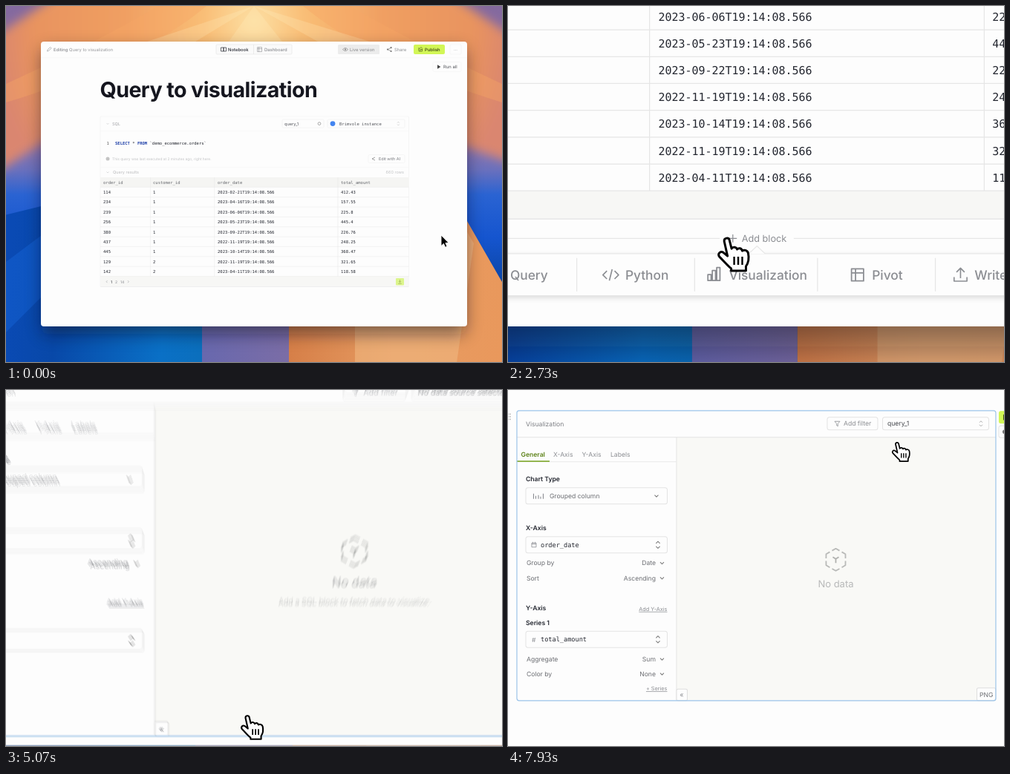
Animation, 668 px wide and 480 px high, one loop 8 s. Source, as an HTML page:

```html
<!DOCTYPE html>
<html lang="en">
<head>
<meta charset="utf-8">
<title>Query to visualization</title>
<style>
html, body { margin: 0; width: 100%; height: 100%; overflow: hidden; background: #fdfdfd; }
svg { display: block; width: 100vw; height: 100vh; font-family: Inter, sans-serif; text-rendering: geometricPrecision; }
.mono { font-family: "DejaVu Sans Mono", monospace; white-space: pre; }
</style>
</head>
<body>
<svg id="stage" viewBox="0 0 668 480"></svg>
<script>
const LOOP = 8000;
const INK = '#23262f', GREY = '#8b8d92', FAINT = '#c3c4c6', LINE = '#e6e6e6', LIME = '#d2f656';

// Drawing helpers
const text = (x, y, s, size, fill = INK, more = '') =>
  `<text x="${x}" y="${y}" font-size="${size}" fill="${fill}" ${more}>${s}</text>`;
const mono = (x, y, s, size, fill = INK, more = '') => text(x, y, s, size, fill, 'class="mono" ' + more);
const box = (x, y, w, h, fill = 'none', stroke = 'none', r = 0, more = '') =>
  `<rect x="${x}" y="${y}" width="${w}" height="${h}" rx="${r}" fill="${fill}" stroke="${stroke}" ${more}/>`;
const line = (d, stroke = GREY, w = 0.6, more = '') =>
  `<path d="${d}" fill="none" stroke="${stroke}" stroke-width="${w}" stroke-linejoin="round" ${more}/>`;
const shape = (d, fill, more = '') => `<path d="${d}" fill="${fill}" ${more}/>`;
const group = (id, inner, more = '') => `<g id="${id}" ${more}>${inner}</g>`;
const stops = list => list.map(([o, c]) => `<stop offset="${o}" stop-color="${c}"/>`).join('');
const bold = 'font-weight="600"', medium = 'font-weight="500"', right = 'text-anchor="end"', mid = 'text-anchor="middle"';
const thin = 'stroke-width=".5"';

const bars = (x, y, c, w) => line(`M${x - 3} ${y}v3h1.6v-3zM${x - .8} ${y - 2}v5h1.6v-5zM${x + 1.4} ${y - 3.5}v6.5h1.6v-6.5z`, c, w);
const grid = (x, y, c, w) => line(`M${x - 3} ${y - 3}h6v6h-6zM${x - 3} ${y - 1}h6M${x - 1} ${y - 3}v6`, c, w);
const down = (x, y) => line(`M${x - 2.5} ${y - 1.2}l2.5 2.5l2.5-2.5`, '#777', 1);
const updown = (x, y) => line(`M${x - 2.6} ${y - 2}l2.6-2.6l2.6 2.6M${x - 2.6} ${y + 2}l2.6 2.6l2.6-2.6`, '#777', 1);

function backdrop() {
  return box(-200, -200, 1068, 900, 'url(#sky)')
    + shape('M-200 600V330L47 270L264 250V600Z', 'url(#sea)')
    + shape('M0 345L60 300L60 380L0 440Z', '#1766dc', 'opacity=".4"')
    // Warm band and its rays
    + shape('M-80 85L78 -20H590L748 85V235L621 190L334 60L47 185L-80 270Z', 'url(#glow)', 'filter="url(#melt)"')
    + shape('M205 0Q130 45 0 105V130Q180 75 270 0Z', '#f6a565', 'opacity=".4"')
    + shape('M463 0Q540 45 668 105V130Q490 75 400 0Z', '#f6a565', 'opacity=".4"')
    + shape('M334 0L190 48H255ZM334 0L300 48H372ZM334 0L420 48H490Z', '#fff0c4', 'opacity=".22"')
    + shape('M264 600V350L334 200L381 350V600Z', 'url(#dusk)')
    + shape('M381 600V300L480 200L621 290L668 372L900 700V600Z', 'url(#sand)')
    + shape('M470 600V430L560 200L630 320L590 600Z', '#f0b880', 'opacity=".6"');
}

function topBar() {
  return line('M47 70H621', '#f3f3f3', .6)
    + line('M55.5 61l.6-2l3.6-3.6l1.4 1.4l-3.6 3.6z', GREY, .6)
    + text(64, 61, `<tspan ${bold}>Editing</tspan> Query to visualization`, 5.8, '#97989c')
    + box(283, 52, 102, 13, '#fafafa', '#dcdcdc', 1.5, thin) + line('M333.5 52v13', '#dcdcdc', .5)
    + line('M289.5 56h3.5v5h-3.5zM293 56h3.5v5h-3.5z', INK, .7) + text(299, 61, 'Notebook', 5.9, INK, medium)
    + grid(341.5, 58.6, GREY, .6) + text(348, 61, 'Dashboard', 5.9, GREY, medium)
    + box(447, 52, 56, 13, '#ececec', 'none', 1.5)
    + line('M453.5 58.6q3.5-4 7 0q-3.5 4-7 0z', '#777') + `<circle cx="457" cy="58.6" r="1" fill="#777"/>`
    + text(463, 61, 'Live version', 5.9, '#858689')
    + line('M518.6 56.2l-4.4 2.4l4.4 2.4', '#777', .7)
    + [[518.6, 56.2], [514, 58.6], [518.6, 61]].map(([x, y]) => `<circle cx="${x}" cy="${y}" r="1.1" fill="#777"/>`).join('')
    + text(523, 61, 'Share', 5.9, GREY)
    + box(549, 52, 42, 13, LIME, 'none', 2)
    + line('M556 56v5h4.5v-3M556 58.5l3-3l2 2M558 61v-2.5h3', '#3f4a15', .6)
    + text(564, 61, 'Publish', 5.9, '#333b12', medium)
    + box(598, 52, 15, 13, 'none', '#ededed', 1.5, thin) + text(605.5, 60, '...', 6, GREY, mid)
    + box(575, 75.5, 38, 13, 'none', '#f0f0f0', 1.5, thin)
    + shape('M581 79.3l4.4 2.7l-4.4 2.7z', '#444') + text(589, 84.2, 'Run all', 5.9, '#4e5056');
}

const COLS = [131, 198, 285, 451];
const ROWS = [
  '114 1 2023-02-21 412.43', '234 1 2023-04-16 157.55', '239 1 2023-06-06 225.8',
  '256 1 2023-05-23 445.4', '380 1 2023-09-22 226.76', '437 1 2022-11-19 248.25',
  '445 1 2023-10-14 368.47', '129 2 2022-11-19 321.65', '142 2 2023-04-11 118.58'];

function queryBlock() {
  let s = text(126.5, 123, 'Query to visualization', 28.6, '#15161f', 'font-weight="700" letter-spacing="-.56"')
    + box(127, 149, 415.5, 229.5, 'none', '#ededed', 1, thin)
    + line('M135.5 158l1.5 1.5l1.5-1.5', FAINT) + text(143, 160.8, 'SQL', 5.6, '#a5a6aa')
    + line('M127 168.5H542', '#f4f4f4', .5)
    + box(372, 153, 56, 11, 'none', '#ebebeb', 1.5, thin) + text(375, 160.6, 'query_1', 5.6, '#55575d')
    + `<circle cx="422" cy="158.6" r="1.9" fill="none" stroke="#aaa" stroke-width="1"/>`
    + box(433, 153, 104, 11, 'none', '#ebebeb', 1.5, thin)
    + `<circle cx="440" cy="158.6" r="3.4" fill="#4385f0"/>`
    + mono(449, 160.6, 'Brimvole instance', 5.55, '#55575d')
    + line('M527 157.6l1.4-1.4l1.4 1.4M527 159.6l1.4 1.4l1.4-1.4', '#aaa', .5)
    + mono(135.5, 187, '1', 5.5, '#555')
    + mono(147, 187, `<tspan fill="#1d3fa8" ${bold}>SELECT</tspan> * <tspan fill="#1d3fa8" ${bold}>FROM</tspan> \`demo_ecommerce.orders\``, 5.52)
    + `<circle cx="137" cy="206" r="2.5" fill="#c4c4c4"/>`
    + text(143, 208, 'This query was last executed at 2 minutes ago, right here.', 4.9, FAINT)
    + box(488, 200.5, 49, 11, 'none', '#efefef', 1.5, thin)
    + line('M497 204l-4 2l4 2', '#777', .7) + text(502, 208, 'Edit with AI', 5.5, '#77797e')
    + line('M127 217.5H542', '#f4f4f4', .5)
    + line('M135.5 223.5l1.5 1.5l1.5-1.5', FAINT)
    + text(144, 226.4, 'Query results', 5.5, '#bcbdbf') + text(536, 226.4, '660 rows', 5.5, FAINT, right)
    + box(127, 231, 415.5, 13.3, '#f5f5f3') + box(127, 364.5, 415.5, 14, '#f7f7f5');
  ['order_id', 'customer_id', 'order_date', 'total_amount'].forEach((h, i) => s += mono(COLS[i], 239.8, h, 5.52, '#66686d'));
  ROWS.forEach((row, i) => {
    const y = 244.3 + 13.36 * i;
    s += line(`M127 ${y}H542.5`, LINE, .45);
    row.split(' ').forEach((v, c) => s += mono(COLS[c], y + 8.8, c == 2 ? v + 'T19:14:08.566' : v, 5.52));
  });
  s += line('M127 364.5H542.5M127 378.5H542.5M194.5 231V364.5M280.6 231V364.5M447 231V364.5', LINE, .45)
    + line('M136.5 370.2l-1.4 1.5l1.4 1.5M164 370.2l1.4 1.5l-1.4 1.5', GREY, .5)
    + text(141, 373.6, '1', 5, INK) + text(147, 373.6, '2', 5, GREY) + text(154, 373.6, '14', 5, GREY)
    + box(525, 367, 11, 9.5, '#dcf58c', 'none', 1) + line('M530.5 369v3.5M529 371.2l1.5 1.5l1.5-1.5M528.3 374.3h4.4', '#7d8c3c', .5);
  return s;
}

function addBlock() {
  const menu = box(127, 395.8, 415.5, 20.9, '#fdfdfd', LINE, 1, 'stroke-width=".45" filter="url(#soft)"')
    + shape('M330 395.9l4-3.8l4 3.8z', '#fdfdfd') + line('M330 395.8l4-3.8l4 3.8', LINE, .45)
    + box(305, 398, 56.6, 16.6, '#efeff1', 'none', 2, 'id="hover"')
    + line('M185 398v16.6M244.4 398v16.6M303 398v16.6M364.1 398v16.6M422.7 398v16.6M490 398v16.6', LINE, .45)
    + text(152, 408.6, 'Text', 6.4, GREY, medium) + line('M141 404h5M143.5 404v5', GREY)
    + line('M200.5 404v5q3 2 6 0v-5q-3-2-6 0q3 2 6 0', GREY)
    + text(211.3, 408.6, 'Query', 6.4, GREY, medium)
    + line('M259.4 404.4l-2 2l2 2M263.2 404.4l2 2l-2 2M262 403.6l-1.4 5.6', GREY)
    + text(268.5, 408.6, 'Python', 6.4, GREY, medium)
    + group('visItem', bars(312.6, 406.2, 'currentColor', .65) + text(320, 408.6, 'Visualization', 6.4, 'currentColor', medium))
    + grid(384, 406.4, GREY, .65) + text(391.2, 408.6, 'Pivot', 6.4, GREY, medium)
    + line('M435.2 408v-5M433.2 405l2-2l2 2M432 407.5v2h6.4v-2', GREY) + text(442.2, 408.6, 'Writeback', 6.4, GREY, medium)
    + text(510, 408.6, 'More', 6.4, GREY, medium);
  return line('M127 388.2H315.5M352.3 388.2H542.5', LINE, .45)
    + line('M320 388.2h4M322 386.2v4', GREY, .45) + text(326.4, 389.9, 'Add block', 4.7, GREY)
    + group('menu', menu);
}

function visBlock() {
  const F = 8.6, SOFT = '#6c6e73';
  const field = (y, icon, label, id) => box(24, y, 190.5, 22, '#fdfdfd', '#e3e3e3', 3)
    + updown(202, y + 11) + group(id + 'Empty', mono(32, y + 14, 'Column', F, '#9a9ba0'))
    + group(id + 'Full', icon + mono(44, y + 14, label, F));
  const option = (y, name, value) => text(25, y, name, F, SOFT) + text(199, y, value, F, SOFT, right) + down(207.5, y - 3);
  const head = (y, s) => text(24, y, s, F, INK, bold);
  const link = (y, s) => text(214.5, y, s, 7.3, GREY, right + ' text-decoration="underline"');

  const panel = text(17.5, 90, 'General', F, '#5d8218', bold)
    + text(61, 90, 'X-Axis', F, GREY) + text(99.5, 90, 'Y-Axis', F, GREY) + text(138, 90, 'Labels', F, GREY)
    + line('M12 97H227', '#e9e9e9', 1) + line('M12 96.3H56', '#86ad3a', 1.7)
    + head(123, 'Chart Type') + box(24, 132, 190.5, 22, '#fdfdfd', '#e3e3e3', 3)
    + line('M34.5 147v-7M37.5 147v-4M41 147v-5M44 147v-3M47.5 147v-7', GREY, 1.1)
    + text(56, 146.2, 'Grouped column', F, SOFT) + down(200, 143)
    + head(189.5, 'X-Axis')
    + field(198, line('M32 206.5h6v5.5h-6zM32 208h6M33.5 205v1.5M36.5 205v1.5', GREY, .8), 'order_date', 'x')
    + group('groupBy', option(236.6, 'Group by', 'Date'))
    + group('lower', option(256.8, 'Sort', 'Ascending')
      + head(297, 'Y-Axis') + link(298, 'Add Y-Axis') + head(317, 'Series 1')
      + field(325.5, text(32, 339.8, '#', F, GREY), 'total_amount', 'y')
      + group('yOptions', option(366, 'Aggregate', 'Sum') + option(386, 'Color by', 'None') + link(405.5, '+ Series')));

  let dash = '';
  for (let a = 0; a < 6; a++) dash += line('M-5-12.2L0-15L5-12.2', '#b9bab8', 1.8, `transform="rotate(${a * 60})"`);

  return box(12, 28, 645, 391, '#fdfdfd', 'none', 3)
    + box(227, 64, 430, 355, '#f9f9f6') + line('M12 64H657M227 64V419', '#e4e4e4', 1)
    + text(24, 49, 'Visualization', F, '#7c7e83')
    + box(430, 37, 68, 17, 'none', '#e3e3e3', 3)
    + line('M440 42.5h7l-2.7 3.2v3.3l-1.6-.9v-2.4z', GREY, .8) + text(452, 48.5, 'Add filter', F, GREY)
    + box(504.5, 37, 143, 17, '#fdfdfd', '#e3e3e3', 3)
    + text(511, 48.5, '', F, '#44464c', 'id="source"')
    + line('M635 44l2-2l2 2M635 47l2 2l2-2', '#999', .8)
    + panel
    + box(227, 403.5, 14.5, 15.5, '#fdfdfd', '#dedede', 2) + text(234, 414.5, '«', 9, GREY, mid)
    + box(631.5, 402, 25.5, 17, '#fdfdfd', '#dedede', 2) + text(644.2, 414, 'PNG', F, SOFT, mid)
    + group('noData', `<g transform="translate(441.5 229)">${dash}${line('M-4-3.5L0-1L4-3.5M0-1V4.5', '#b0b1af', 1.8)}</g>`
      + text(441.5, 266.6, 'No data', 13, '#b8b9b9', mid))
    + text(441.5, 277.5, 'Add a SQL block to fetch data to visualize.', 8.2, '#c6c7c6', mid + ' id="hint"')
    + box(12, 28, 645, 391, 'none', '#9cc4ea', 3, 'stroke-width="1.2"')
    + group('list', box(504.5, 57, 143, 32, '#fff', '#e0e0e0', 3, 'filter="url(#soft)"')
      + box(508, 62, 136, 21, '#f0f0f1', 'none', 2) + text(514, 75.5, 'query_1', F))
    + group('tools', box(661, 28.5, 18, 17, LIME, 'none', 3) + shape('M667 33l7 4l-7 4z', '#48551a')
      + box(661, 48.5, 18, 16, '#fdfdfd', '#e3e3e3', 3) + `<circle cx="669" cy="56.5" r="3" fill="#777"/>`
      + line('M-.2 32v9M2.8 32v9', '#aaa', 1.5, 'stroke-dasharray="1.5 2"'));
}

const K = 1.554, BLOCK_Y = 403, SCROLL = 277, COPIES = 7;
const grad = (id, kind, at, list) => `<${kind}Gradient id="${id}" ${at}>${stops(list)}</${kind}Gradient>`;
const user = 'gradientUnits="userSpaceOnUse"';

const defs = grad('sky', 'linear', user + ' x1="0" y1="0" x2="0" y2="480"',
    [[0, '#84699f'], [.15, '#8a6ea2'], [.36, '#a078a4'], [.46, '#6a70bd'], [.53, '#2a63d2'], [.65, '#1555cf'], [.78, '#0b45a4'], [1, '#0a5fb8']])
  + grad('sea', 'linear', user + ' x1="0" y1="420" x2="264" y2="440"', [[0, '#0a4ab4'], [.25, '#0848a8'], [.8, '#0a70c6'], [1, '#0b6fbd']])
  + grad('glow', 'radial', user + ' cx="334" cy="20" r="350"', [[0, '#fde0a4'], [.2, '#f9bd75'], [.5, '#f09f62'], [.85, '#e8935f'], [1, '#da8670']])
  + grad('dusk', 'linear', user + ' x1="264" y1="0" x2="381" y2="0"', [[0, '#6868ae'], [1, '#7b6da6']])
  + grad('sand', 'linear', user + ' x1="381" y1="0" x2="668" y2="0"', [[0, '#d67f48'], [.5, '#e79c62'], [1, '#e9985c']])
  + `<filter id="melt" x="-5%" y="-10%" width="110%" height="120%"><feGaussianBlur stdDeviation="7"/></filter>`
  + `<filter id="blur" x="-20%" y="-20%" width="140%" height="150%"><feGaussianBlur stdDeviation="11"/></filter>`
  + `<filter id="soft" x="-5%" y="-20%" width="110%" height="160%"><feDropShadow dx="0" dy="1" stdDeviation="1.4" flood-opacity=".13"/></filter>`
  + `<clipPath id="page">${box(47, 72, 574, 360)}</clipPath>`
  + group('win', box(47, 48, 574, 384, '#fdfdfd', 'none', 4)
    + `<g clip-path="url(#page)">${group('content', queryBlock() + group('add', addBlock())
      + group('vis', visBlock(), `transform="translate(127 ${BLOCK_Y}) scale(${1 / K}) translate(-12 -28)"`))}</g>` + topBar());

const HAND = 'M-3.5 4C-4-1 2.5-1.5 3.5 2L6.5 14C8 11 13 11.5 14 15C16 12.5 20 13 21 17C23 15 28 16 29 20C30.5 27 29.5 33 26 38V44H6V41C1 37-3 32-10 25C-13 21-9 17-5 19L1 24Z';
const layers = Array.from({ length: COPIES }, (_, i) => `<use href="#win" class="layer" opacity="${1 / (i + 1)}"/>`).join('');

document.getElementById('stage').innerHTML = `<defs>${defs}</defs>`
  + group('back', backdrop())
  + group('shade', box(49, 58, 570, 384, '#0a0a1e', 'none', 6, 'opacity=".5" filter="url(#blur)"'))
  + layers
  + group('cursor',
    group('arrow', shape('M0 0V14.5L3.4 11.4L5.6 16.3L8 15.3L5.9 10.5H10.2Z', '#000', 'stroke="#fff" stroke-width=".9"'))
    + group('hand', shape(HAND, '#fff', 'stroke="#000" stroke-width="3" stroke-linejoin="round"')
      + line('M10 25v11M15.5 25v11M21 25v11', '#000', 2.4), 'transform="scale(.366)"'));

const $ = id => document.getElementById(id);
const copies = [...document.querySelectorAll('.layer')];
const show = (id, on) => $(id).setAttribute('display', on ? 'inline' : 'none');
const place = (el, [s, x, y]) => el.setAttribute('transform', `translate(${x} ${y}) scale(${s})`);
const mix = (a, b, u) => a + (b - a) * u;
const ramp = (t, a, b) => Math.min(1, Math.max(0, (t - a) / (b - a)));
const ease = u => u * u * u * (u * (6 * u - 15) + 10);
// Critically damped spring
const spring = ms => { const x = Math.max(0, ms) * .00504; return 1 - (1 + x) * Math.exp(-x); };

// Camera as [scale, x, y]
const VIEWS = [[1, 0, 0], [2.73, -576.5, -747.4], [K, -185.4, -168]];
function camera(t) {
  const a = spring(t - 1460), b = spring(t - 4617);
  return VIEWS[0].map((v, i) => mix(mix(v, VIEWS[1][i], a), VIEWS[2][i], b));
}

// Pointer moves: start, end, x, y
const MOVES = [[150, 1500, 319, 388.2], [3050, 3950, 329.3, 411.4], [5700, 6700, 468, 138], [7150, 7650, 456.5, 153.8]];
const pointer = t => MOVES.reduce(([px, py], [a, b, x, y]) => {
  const u = ease(ramp(t, a, b));
  return [mix(px, x, u), mix(py, y, u)];
}, [586, 309]);

function draw(t) {
  const cam = camera(t), before = camera(t - 14), after = camera(t + 14);
  const moving = Math.abs(after[0] / before[0] - 1) > .003;
  copies.forEach((el, i) => {
    el.setAttribute('display', i == 0 || moving ? 'inline' : 'none');
    place(el, moving ? camera(t + (i / (COPIES - 1) - .5) * 28) : cam);
  });
  place($('shade'), cam);
  const z = 1 + (cam[0] - 1) * .124;
  place($('back'), [z, 340 * (1 - z), 440 * (1 - z)]);

  const [x, y] = pointer(t);
  place($('cursor'), [cam[0], cam[1] + x * cam[0], cam[2] + y * cam[0]]);
  show('hand', t >= 1220);
  show('arrow', t < 1220);

  const added = t >= 4750, filled = t >= 7860;
  $('content').setAttribute('transform', `translate(0 ${-SCROLL * ease(ramp(t, 4780, 5200))})`);
  show('add', t > 1220 && !added);
  $('add').setAttribute('opacity', ramp(t, 1220, 1400));
  show('menu', t > 2380);
  $('menu').setAttribute('opacity', ramp(t, 2380, 2500));
  const over = y > 397 && t > 3000;
  show('hover', over);
  $('visItem').setAttribute('color', over ? '#3c3e45' : GREY);

  show('vis', added);
  show('list', t >= 6930 && !filled);
  show('tools', t >= 6150);
  $('source').textContent = filled ? 'query_1' : 'No data source selected';
  for (const id of ['xFull', 'yFull', 'groupBy', 'yOptions']) show(id, filled);
  for (const id of ['xEmpty', 'yEmpty', 'hint']) show(id, !filled);
  $('lower').setAttribute('transform', `translate(0 ${filled ? 0 : -20.3})`);
  $('noData').setAttribute('transform', `translate(0 ${filled ? 0 : -8.5})`);
}

const start = performance.now();
function tick() {
  draw((performance.now() - start) % LOOP);
  requestAnimationFrame(tick);
}
draw(0);
requestAnimationFrame(tick);
</script>
</body>
</html>
```
